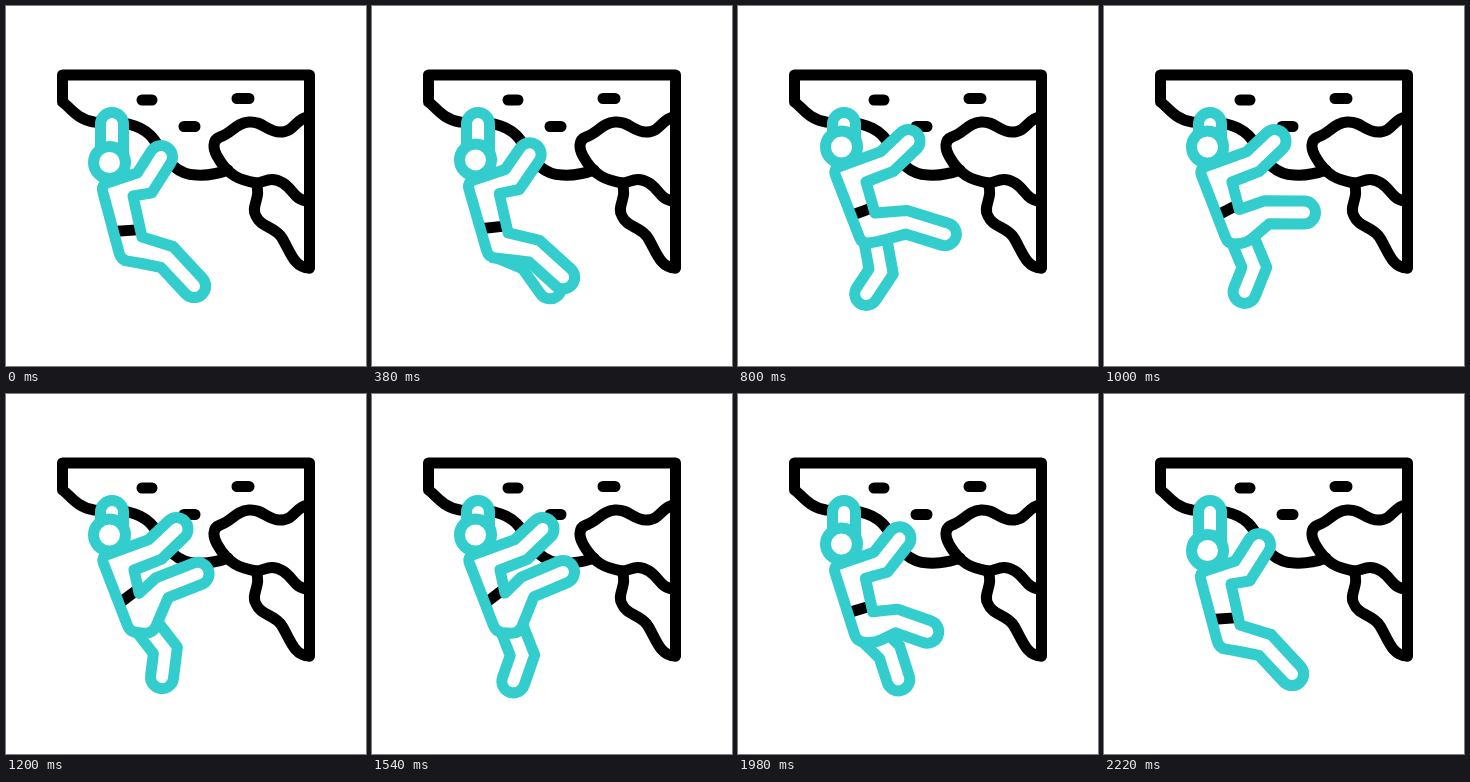
Write an HTML page that moves like this. It is 360 by 360 pixels and loops after 2400 ms.

```html
<!DOCTYPE html>
<html lang="en">
<head>
<meta charset="utf-8">
<title>Climber</title>
<style>
html, body { margin: 0; width: 100%; height: 100%; overflow: hidden; background: #fff; }
svg { display: block; width: 100vw; height: 100vh; }
path, circle { stroke-width: 11; stroke-linejoin: round; }
.rock { fill: none; stroke: #000; stroke-linecap: round; }
.skin { fill: #fff; stroke: #33cdcd; }
.line { fill: none; }
.fill { stroke: none; }
#belt { stroke: #000; }
</style>
</head>
<body>
<svg viewBox="0 0 360 360">
  <g class="rock">
    <path d="M303.5 262V69H56.5V96C64 101 70 113 88 116C108 117 128 114 144 129C158 143 162 168 190 169Q206 170 222 164"/>
    <path d="M302 111C289 113 289 126 274 126C261 126 257 115 243 116C230 117 226 127 214 131C206 134 207 143 211 150C222 170 234 174 250 177C258 177 264 169 277 177C288 184 288 194 302 195"/>
    <path d="M250 177C256 192 244 200 250 210C255 222 269 220 276 232C284 245 288 262 303 262"/>
    <path d="M136 94h10M178 120.5h11M231 92.5h12"/>
  </g>
  <path class="skin" id="backLeg"/>
  <path class="skin" d="M94.5 150V118a11.5 11.5 0 0 1 23 0V150"/>
  <path class="skin fill torso"/>
  <path id="belt"/>
  <path class="skin line torso"/>
  <circle class="skin" id="head" cx="103.5" r="16"/>
</svg>
<script>
const LOOP = 2400, HALF = 11.5;
const KEYS = [220, 750, 1290, 1830, 2220];

// Torso: head, shoulder, elbow, hand, armpit, hip
const hang = [[103.5, 156.5], [95, 179], [138.5, 177], [155, 151], [127, 190], [115, 254]];
const reach = [[103.5, 141], [95, 163], [149, 155.5], [170.5, 135], [128, 176], [124, 238]];

// Front leg: waist, knee, foot, crotch
const hangLeg = [[136, 231], [161, 251], [188, 280], [128, 256]];
const kick = [[137, 207], [168.5, 216.5], [207, 228.5], [138, 236]];
const tuck = [[133, 199], [155.5, 193], [191, 178], [147, 240]];

// Back leg: root, knee, foot
const trail = [[126, 242.5], [161, 251], [188, 280]];
const push = [[137, 232], [143, 265.5], [128, 288]];
const swing = [[139, 230], [160, 256], [157, 283]];
const search = [[138, 232], [138, 268], [121, 293]];

const tracks = {
  torso: [hang, reach, reach, reach, hang],
  front: [hangLeg, kick, tuck, tuck, hangLeg],
  back: [trail, push, swing, search, trail]
};

const $ = id => document.getElementById(id);
const mix = (a, b, k) => a.map((v, i) => v + (b[i] - v) * k);
const add = (p, q, k) => [p[0] + q[0] * k, p[1] + q[1] * k];
const smooth = t => t * t * t * (t * (6 * t - 15) + 10);
const settle = t => 1 - (1 - t) ** 1.8;

function normal(a, b) {
  const dx = b[0] - a[0], dy = b[1] - a[1], len = Math.hypot(dx, dy);
  return [dy / len, -dx / len];
}

// Offsets a two-bone limb to both sides; the joint is mitred.
function limb(root, joint, end) {
  const n = normal(root, joint), m = normal(joint, end);
  const bend = add(n, m, 1), dot = n[0] * m[0] + n[1] * m[1];
  const side = k => [add(root, n, k), add(joint, bend, k / (1 + dot)), add(end, m, k)];
  const [rootA, jointA, endA] = side(HALF), [rootB, jointB, endB] = side(-HALF);
  const tip = `L${jointA}L${endA}A1 1 0 0 1 ${endB}L${jointB}`;
  return { rootA, rootB, jointA, jointB, tip };
}

function corner(prev, p, next, r, cmd = "L") {
  const toward = q => mix(p, q, r / Math.hypot(q[0] - p[0], q[1] - p[1]));
  return `${cmd}${toward(prev)}Q${p} ${toward(next)}`;
}

function pose(track, time) {
  const t = Math.min(Math.max(time, KEYS[0]), KEYS[4] - 0.01);
  const i = KEYS.findLastIndex(key => key <= t);
  const part = (t - KEYS[i]) / (KEYS[i + 1] - KEYS[i]);
  const k = (i === 3 ? settle : smooth)(part);
  return track[i].map((p, j) => mix(p, track[i + 1][j], k));
}

function draw(time) {
  const [head, shoulder, elbow, hand, armpit, hip] = pose(tracks.torso, time);
  const [waist, knee, foot, crotch] = pose(tracks.front, time);
  const arm = limb(mix(shoulder, armpit, 0.5), elbow, hand);
  const leg = limb(mix(waist, hip, 0.5), knee, foot);
  const back = limb(...pose(tracks.back, time));

  const outline = corner(hip, shoulder, arm.jointA, 7, "M") + arm.tip +
    `L${armpit}L${waist}` + leg.tip +
    corner(leg.jointB, crotch, hip, 9) + corner(crotch, hip, shoulder, 7) + "Z";
  for (const el of document.querySelectorAll(".torso")) el.setAttribute("d", outline);

  $("backLeg").setAttribute("d", `M${back.rootA}${back.tip}L${back.rootB}`);
  $("belt").setAttribute("d", `M${mix(shoulder, hip, 0.62)}L${mix(armpit, waist, 0.82)}`);
  $("head").setAttribute("cy", head[1]);
}

function tick() {
  draw(performance.now() % LOOP);
  requestAnimationFrame(tick);
}
tick();
</script>
</body>
</html>
```
